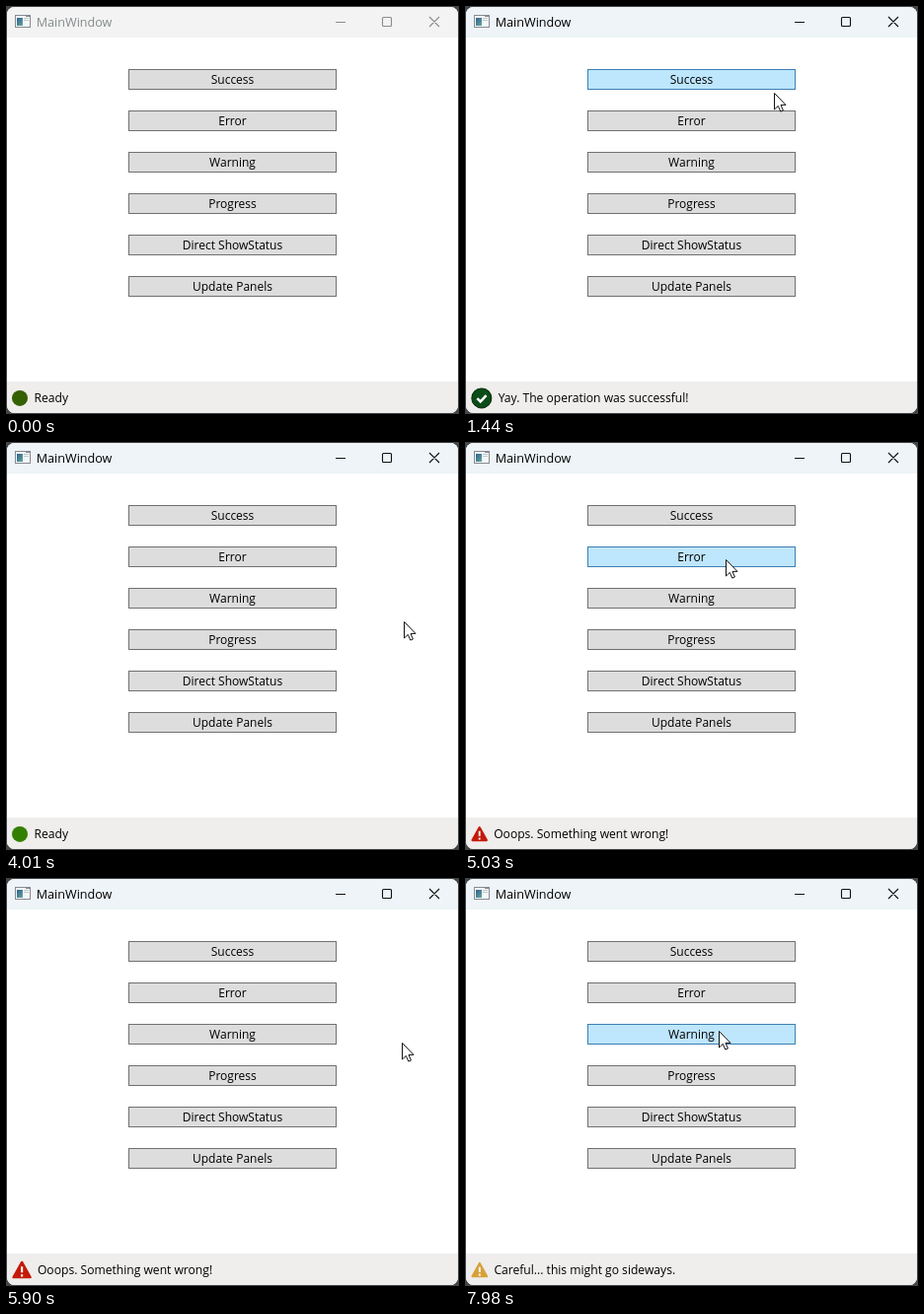
An HTML page that plays this animation: 459x414 px, repeating every 8000 ms.

```html
<!DOCTYPE html>
<html lang="en">
<head>
<meta charset="utf-8">
<title>MainWindow</title>
<style>
  html, body { margin: 0; width: 100%; height: 100%; overflow: hidden; background: #43474a; }
  svg { display: block; width: 459px; height: 414px; font: 12px "Open Sans", "Noto Sans", sans-serif; }
  .btn rect { fill: #ddd; stroke: #707070; }
  .btn.hover rect { fill: #bee6fd; stroke: #3c7fb1; }
  .btn.pressed rect { fill: #c4e5f6; stroke: #2c628b; }
  .btn text { text-anchor: middle; }
  #bar { fill: #eef4f8; }
  #title { font-size: 12.6px; }
  #message { font-size: 12.1px; }
  #caption { fill: none; stroke: #111; stroke-width: 1.1; }
  .inactive #bar { fill: #f3f3f3; }
  .inactive #title { fill: #858b8d; }
  .inactive #caption { stroke: #8c8c8c; }
  .icon { display: none; }
  .icon.on { display: inline; }
  .sign path { stroke: #fff; stroke-width: 1.8; }
  .sign path:first-child { fill: currentColor; stroke: currentColor; stroke-width: 2; stroke-linejoin: round; }
</style>
</head>
<body>
<svg id="app" viewBox="0 0 459 414">
  <defs>
    <clipPath id="frame"><rect x="1" y="1" width="457" height="412" rx="7.5"/></clipPath>
    <linearGradient id="pane" x2="1" y2="1">
      <stop stop-color="#2f5f93"/><stop offset="1" stop-color="#62a99b"/>
    </linearGradient>
    <g id="sign" class="sign">
      <path d="M8.1-6.6l7 12.6h-14z"/>
      <path d="M8.1-3v5M8.1 3.5v2"/>
    </g>
  </defs>
  <g clip-path="url(#frame)">
    <rect width="459" height="414" fill="#fff"/>
    <rect id="bar" width="459" height="32"/>
    <rect y="381" width="459" height="33" fill="#f0eeec"/>
  </g>

  <g>
    <rect x="9.5" y="9.5" width="15" height="12" fill="#f4f6f7" stroke="#858b90"/>
    <rect x="11" y="12" width="6" height="8" fill="url(#pane)"/>
    <path d="M18 12.5h5M18 14.5h5" stroke="#c3c9ce"/>
    <path d="M20 10.5h4" stroke="#858b90"/>
  </g>
  <text id="title" x="30.7" y="21">MainWindow</text>
  <path id="caption" d="M334 16.5h10M382.5 11.5h7q1 0 1 1v7q0 1-1 1h-7q-1 0-1-1v-7q0-1 1-1zM429 11l10 10M439 11l-10 10"/>

  <g id="buttons"></g>

  <g id="status">
    <circle class="icon" cx="7.7" r="8"/>
    <g class="icon">
      <circle cx="8" r="7.6" fill="#0b4d18" stroke="#06300f" stroke-width=".8"/>
      <path d="M4.6 .2l2.5 2.5 4.5-4.8" fill="none" stroke="#fff" stroke-width="1.9"/>
    </g>
    <use class="icon" href="#sign" color="#c41a0b"/>
    <use class="icon" href="#sign" color="#d7a03a"/>
  </g>
  <text id="message" y="402"></text>

  <path id="cursor" d="M.5 .5V17l3.8-3.6 2.5 5.7 2.6-1.1L7 12.4h5z" fill="#fff" stroke="#111" stroke-linejoin="round"/>
</svg>
<script>
const LOOP = 8000, STEP = 72, LAG = 80;
const $ = id => document.getElementById(id);

const labels = ['Success', 'Error', 'Warning', 'Progress', 'Direct ShowStatus', 'Update Panels'];
const left = 124, top0 = 64, pitch = 42, width = 211, height = 21;
$('buttons').innerHTML = labels.map((label, i) => {
  const y = top0 + i * pitch;
  return `<g class="btn"><rect x="${left + .5}" y="${y + .5}" width="${width - 1}" height="${height - 1}"/>` +
         `<text x="229.5" y="${y + 15}">${label}</text></g>`;
}).join('');
const buttons = [...document.querySelectorAll('.btn')];
const icons = [...document.querySelectorAll('.icon')];

// Pointer sweeps along a curve: start time, duration, bend and end point
const enter = { at: 69, from: [394, 329] };
const moves = [
  { at: 69, dur: 640, bend: [320, 0], to: [289, 79] },
  { at: 1375, dur: 372, bend: [460, 141], to: [403, 182] },
  { at: 4340, dur: 430, bend: [330, 125], to: [264, 119] },
  { at: 5423, dur: 675, bend: [390, 142], to: [422, 188] },
  { at: 7270, dur: 500, bend: [310, 122], to: [257, 155] }
];

// Each click presses a button briefly, then shows a result until it is reset
const clicks = [
  { press: 930, at: 1005, reset: 4005, text: 'Yay. The operation was successful!' },
  { press: 4870, at: 4970, reset: 6960, text: 'Ooops. Something went wrong!' },
  { press: 7820, at: 7900, reset: LOOP, text: 'Careful... this might go sideways.' }
];

const ease = u => u * u * (3 - 2 * u);

function pointer(t) {
  let pos = enter.from;
  for (const { at, dur, bend, to } of moves) {
    if (t < at) break;
    const u = ease(Math.min(1, (t - at) / dur)), v = 1 - u;
    pos = pos.map((p, i) => v * v * p + 2 * u * v * bend[i] + u * u * to[i]);
  }
  return pos;
}

function hovered(t) {
  if (t < enter.at) return -1;
  const [x, y] = pointer(t);
  const i = Math.floor((y - top0) / pitch);
  const inside = x >= left && x < left + width && y - top0 - i * pitch < height;
  return inside ? i : -1;
}

// The picture advances in fixed steps
function snap(t) {
  const base = t < 4000 ? -3 : 50;
  return Math.max(0, base + Math.floor((t - base) / STEP) * STEP);
}

function draw(t) {
  const [x, y] = pointer(t).map(Math.round);
  $('cursor').setAttribute('transform', `translate(${x} ${y})`);
  $('cursor').style.display = t < enter.at ? 'none' : '';
  $('app').classList.toggle('inactive', t < clicks[0].press);

  const hot = hovered(t - LAG);
  const down = clicks.some(c => t >= c.press && t < c.press + STEP);
  buttons.forEach((b, i) => {
    b.classList.toggle('hover', i === hot);
    b.classList.toggle('pressed', i === hot && down);
  });

  // A result icon swells and shrinks back once
  const n = clicks.findIndex(c => t >= c.at && t < c.reset);
  const result = clicks[n];
  const grow = result ? 7 * Math.max(0, 1 - Math.abs((t - result.at) / 600 - 1)) : 0;
  icons.forEach((el, i) => el.classList.toggle('on', i === n + 1));
  icons[0].setAttribute('fill', t < clicks[0].at ? '#336000' : '#338000');
  $('status').setAttribute('transform', `translate(6.3 397.9) scale(${1 + grow / 16})`);
  $('message').setAttribute('x', 28.6 + grow);
  $('message').textContent = result ? result.text : 'Ready';
}

const origin = performance.now();
function tick() {
  draw(snap((performance.now() - origin) % LOOP));
  requestAnimationFrame(tick);
}
tick();
</script>
</body>
</html>
```
